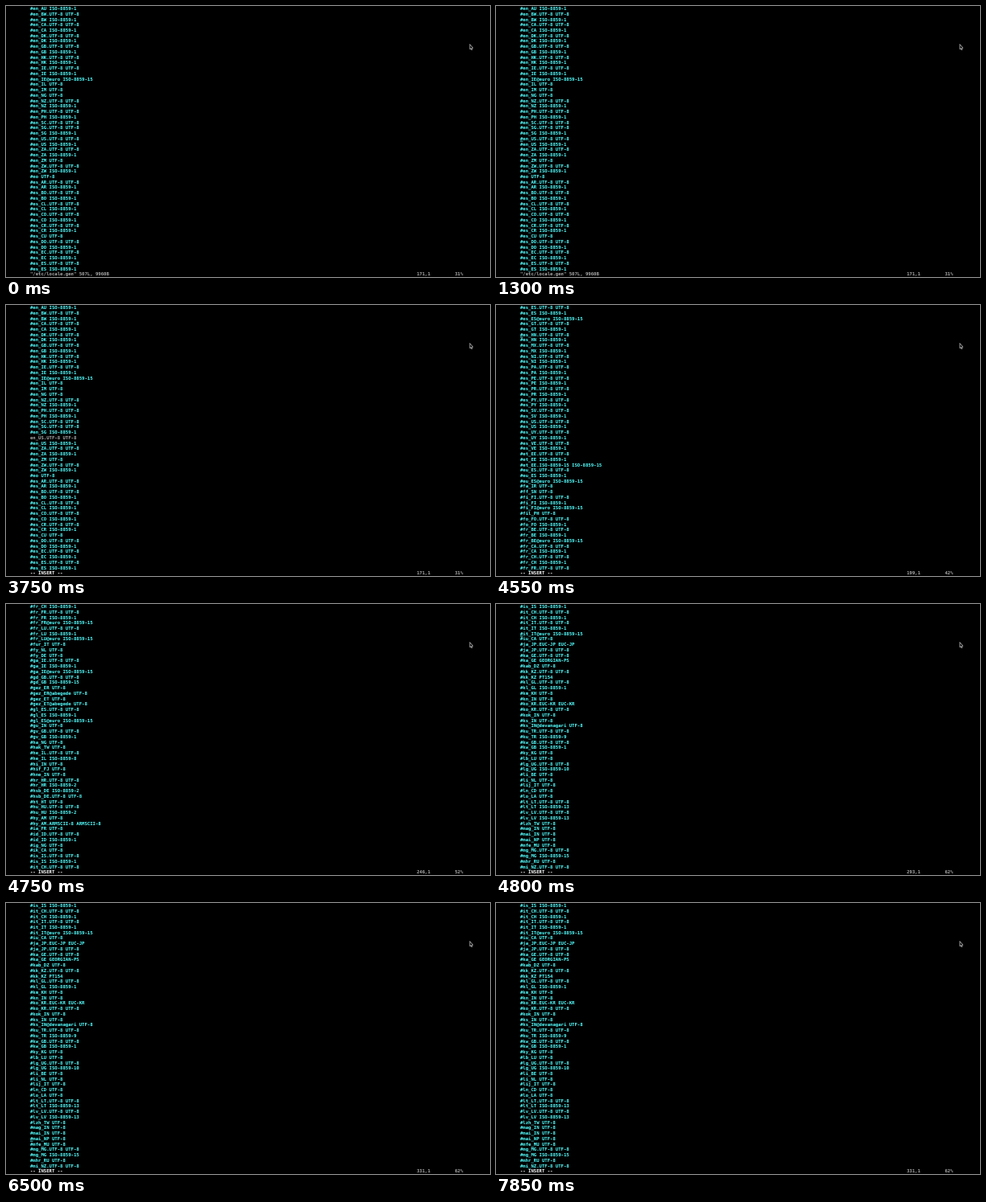
Animation of 600x337 px, one loop 8 s. Source, as an HTML page with a canvas:

```html
<!DOCTYPE html>
<html lang="en">
<head>
<meta charset="utf-8">
<title>Locale list in a terminal editor</title>
<style>
html, body { margin: 0; width: 100%; height: 100%; overflow: hidden; background: #000; }
canvas { display: block; width: 100vw; height: 100vh; }
</style>
</head>
<body>
<canvas id="screen" width="600" height="337"></canvas>
<script>
const LOOP = 8000;
const LEFT = 30, CELL_W = 3.375, CELL_H = 6.74;
const ROWS = 49, FIRST = 147, TOTAL = 507, EDITED = 171;
const PAGE = ROWS - 2, MARGIN = 5;
const BLINK = 204, PHASE = 58, STEP = 50;
const CYAN = '#55ffff', GREY = '#aaaaaa', WHITE = '#ffffff';

// "+": UTF-8 and ISO-8859 lines, "=": ISO only, "@": euro variant (part 1 unless given),
// ".": explicit UTF-8, "|": literal charset, bare: plain UTF-8.
const SPEC = `
en_AU= BW+ CA+ DK+ GB+ HK+ IE+ IE@ IL IM NG NZ+ PH+ SC. SG+ US+ ZA+ ZM ZW+ eo|UTF-8
es_AR+ BO+ CL+ CO+ CR+ CU DO+ EC+ ES+ ES@ GT+ HN+ MX+ NI+ PA+ PE+ PR+ PY+ SV+ US+ UY+ VE+
et_EE+ et_EE.ISO-8859-15|ISO-8859-15 eu_ES+ ES@ fa_IR ff_SN fi_FI+ FI@ fil_PH fo_FO+
fr_BE+ BE@ CA+ CH+ FR+ FR@ LU+ LU@ fur_IT fy_NL DE
ga_IE+ IE@ gd_GB+15 gez_ER ER@abegede ET ET@abegede gl_ES+ ES@ gu_IN gv_GB+
ha_NG hak_TW he_IL+8 hi_IN hif_FJ hne_IN hr_HR+2 hsb_DE=2 DE. ht_HT hu_HU+2
hy_AM hy_AM.ARMSCII-8|ARMSCII-8 ia_FR id_ID+ ig_NG ik_CA is_IS+ it_CH+ IT+ IT@ iu_CA
ja_JP.EUC-JP|EUC-JP ja_JP. ka_GE. ka_GE|GEORGIAN-PS kab_DZ kk_KZ. kk_KZ|PT154 kl_GL+
km_KH kn_IN ko_KR.EUC-KR|EUC-KR ko_KR. kok_IN ks_IN IN@devanagari ku_TR+9 kw_GB+ ky_KG
lb_LU lg_UG+10 li_BE NL lij_IT ln_CD lo_LA lt_LT+13 lv_LV+13 lzh_TW
mag_IN mai_IN NP mfe_MU mg_MG+15 mhr_RU mi_NZ+13 miq_NI mjw_IN mk_MK+5 ml_IN mn_MN mni_IN
mnw_MM mr_IN ms_MY+ mt_MT+3 my_MM
nan_TW TW@latin nb_NO+ nds_DE NL ne_NP nhn_MX niu_NU NZ nl_AW BE+ BE@ NL+ NL@
nn_NO+ nr_ZA nso_ZA oc_FR+ om_ET KE+ or_IN os_RU pa_IN PK pap_AW CW`;

function expand(spec) {
  let lang = '';
  return spec.trim().split(/\s+/).flatMap(token => {
    if (token.includes('|')) return token.replace('|', ' ');
    if (token.includes('_')) lang = token.split('_')[0];
    else token = lang + '_' + token;
    const [, name, mark, part] = token.match(/^(\w+)([+=.@]?)(.*)$/);
    const utf = name + '.UTF-8 UTF-8';
    const iso = name + ' ISO-8859-' + (part || 1);
    if (mark === '+') return [utf, iso];
    if (mark === '=') return iso;
    if (mark === '.') return utf;
    if (mark === '@' && !part) return name + '@euro ISO-8859-15';
    return token + ' UTF-8';
  });
}
const lines = expand(SPEC);

const actions = {
  open: () => ({ top: FIRST, row: EDITED - FIRST, col: 0, insert: false, edited: false }),
  append: v => ({ ...v, col: 1, insert: true }),
  backspace: v => ({ ...v, col: 0, edited: true }),
  pageDown: v => ({ ...v, top: v.top + PAGE, row: MARGIN }),
  pageUp: v => ({ ...v, top: v.top - PAGE, row: ROWS - 1 - MARGIN })
};
const keys = [
  [-150, 'open'], [1800, 'append'], [2450, 'backspace'], [4550, 'pageDown'],
  [4600, 'pageDown'], [4800, 'pageDown'], [5900, 'pageDown'], [6500, 'pageUp']
];

const blinks = t => Math.floor((t - PHASE) / BLINK);

const ctx = document.getElementById('screen').getContext('2d');

function write(text, row, col, color) {
  ctx.fillStyle = color;
  ctx.fillText(text, col * 8, row * 16 + 12);
}

function drawPointer() {
  ctx.beginPath();
  [[575, 47.6], [575, 53.8], [576.3, 52.7], [577.1, 54.6], [578, 54.2], [577.3, 52.4], [578.9, 52.2]]
    .forEach(([x, y]) => ctx.lineTo(x, y));
  ctx.closePath();
  ctx.strokeStyle = '#e0e0e0';
  ctx.lineWidth = 0.7;
  ctx.stroke();
}

function draw(time) {
  // The terminal refreshes in fixed steps.
  const t = Math.floor(time / STEP) * STEP;
  const pressed = keys.filter(([at]) => at <= t);
  const view = pressed.reduce((v, [, name]) => actions[name](v), null);
  const lastKey = pressed[pressed.length - 1][0];
  const cursorOn = (blinks(t) - blinks(lastKey)) % 2 === 0;
  const isEdited = n => view.edited && n === EDITED;
  const current = view.top + view.row;

  ctx.setTransform(1, 0, 0, 1, 0, 0);
  ctx.fillStyle = '#000';
  ctx.fillRect(0, 0, 600, 337);
  drawPointer();

  // Text is laid out on an 8 by 16 cell grid.
  ctx.setTransform(CELL_W / 8, 0, 0, CELL_H / 16, LEFT, 0);
  ctx.font = 'bold 13.29px "DejaVu Sans Mono", monospace';
  ctx.textRendering = 'geometricPrecision';
  for (let r = 0; r < ROWS; r++) {
    const n = view.top + r, text = lines[n - FIRST];
    if (isEdited(n)) write(text, r, 0, GREY);
    else write('#' + text, r, 0, CYAN);
  }

  if (view.insert) write('-- INSERT --', ROWS, 0, WHITE);
  else write('"/etc/locale.gen" 507L, 9960B', ROWS, 0, GREY);
  const percent = Math.floor((view.top - 1) * 100 / (TOTAL - ROWS));
  write(`${current},${view.col + 1}`, ROWS, 142, GREY);
  write(percent + '%', ROWS, 156, GREY);

  if (cursorOn) {
    ctx.fillStyle = isEdited(current) ? GREY : CYAN;
    ctx.fillRect(view.col * 8, view.row * 16 + 14, 8, 2);
  }
}

const start = performance.now();
function tick() {
  draw((performance.now() - start) % LOOP);
  requestAnimationFrame(tick);
}
tick();
</script>
</body>
</html>
```
